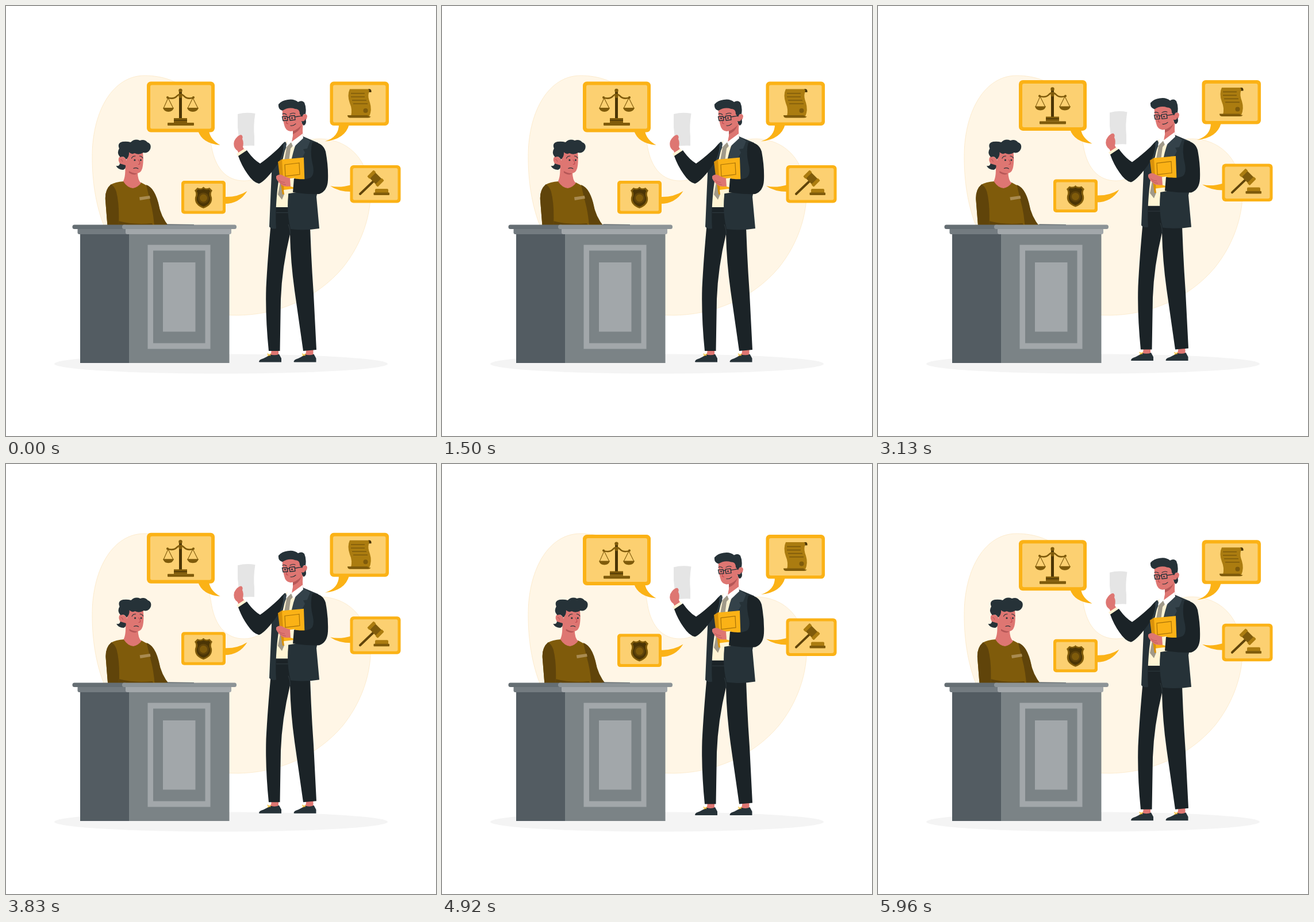
An HTML page for the animation above (6000 ms loop, 748x748 px).

```html
<!DOCTYPE html>
<html lang="en">
<head>
<meta charset="utf-8">
<title>Courtroom</title>
<style>
html, body { margin: 0; width: 100%; height: 100%; overflow: hidden; background: #fff; }
svg { display: block; width: 100vw; height: 100vh; }
.ink { fill: #263238; }
.coal { fill: #1b2327; }
.skin { fill: #de7672; }
.shade { fill: #b55757; }
.gold { fill: #fbb216; }
.pale { fill: #fcd071; }
.brown { fill: #7f5b0b; }
.dark { fill: #4b3505; }
.ochre { fill: #ab7c10; }
.cream { fill: #fff4d4; }
.line { fill: none; stroke: #263238; stroke-width: 1.1; stroke-linecap: round; }
.cut { fill: none; stroke: #7f5b0b; stroke-width: 1.6; }
</style>
</head>
<body>
<svg viewBox="0 0 748 748">
  <!-- backdrop -->
  <path fill="#fff6e6" stroke="#fbe6c0" stroke-width=".7" d="M241 121C186 121 151 182 150 258C149 350 176 430 250 492C300 532 352 538 405 538C470 537 540 510 586 455C614 420 631 378 634 335C635 275 602 233 548 231C505 230 481 259 459 281C446 296 432 304 414 304C383 304 366 282 359 252C353 224 351 185 327 157C305 131 272 121 241 121Z"/>
  <ellipse cx="374" cy="622.5" rx="290" ry="17" fill="#f4f4f4"/>

  <g id="accused">
    <path class="brown" d="M205 305Q190 306 182 311Q172 320 173 337L178 400H284Q270 372 267 352Q260 321 250 315L235 307Q220 312 205 305Z"/>
    <path fill="#60440a" d="M183 310Q172 319 173 337L178 400H195Q199 350 192 323Q189 314 183 310ZM244 311Q258 316 265 342Q269 366 284 384V400H259Q258 365 251 340Q247 324 244 311ZM196 374Q222 381 254 378L258 384H196Z"/>
    <path fill="#a98b51" d="M232 332.500L250 330L251 335L233 338Z"/>
    <path class="skin" d="M207 272Q209 295 204 305Q211 316 221 317Q230 315 235 308Q229 303 229 288Z"/>
    <path class="shade" d="M214 287Q220 291 228 291Q224 296 214 290Z"/>
    <path class="skin" d="M210 250Q229 241 238 253Q240 272 237 283Q234 292 226 291Q214 290 207 277Q198 278 196 269Q195 260 203 262Q208 264 210 269Z"/>
    <path class="ink" d="M199 263Q192 256 197 248Q193 238 203 236Q211 235 217 237Q224 230 233 234Q241 231 246 237Q254 240 251 249Q247 257 239 255Q231 260 224 256Q218 259 214 254Q215 262 209 267Q205 260 199 263ZM198 274Q198 279 191.500 278Q195 285 204 285Q209 283 208 277Z"/>
    <circle class="ink" cx="224" cy="268" r="1.6"/><circle class="ink" cx="234.500" cy="268" r="1.5"/>
    <path class="line" d="M218.500 265Q220 261 225 261M232.500 261Q236 261 238 264.500M222 282.500Q226 280.500 230 283"/>
    <path d="M230 267Q234 272 233 275L230 275.500" fill="none" stroke="#ba4149"/>
    <path d="M199 267Q202 266 203 271" fill="none" stroke="#b55757"/>
  </g>

  <!-- dock -->
  <path d="M278 381L281 379.500L327 380V382H278Z" fill="#39444a"/>
  <rect x="129" y="392" width="86" height="229" fill="#535c62"/>
  <rect x="214" y="392" width="174.500" height="229" fill="#7b8386"/>
  <rect x="124.500" y="386" width="90" height="11" rx="3" fill="#737b80"/>
  <rect x="208" y="386" width="184" height="11" rx="3" fill="#a2a7aa"/>
  <rect x="115.500" y="380.500" width="95" height="7.500" rx="3.500" fill="#656e73"/>
  <rect x="202" y="380.500" width="199" height="7.500" rx="3.500" fill="#8d9497"/>
  <g fill="#a2a7aa">
    <rect x="246.500" y="415.500" width="109" height="181"/>
    <rect x="256" y="425.500" width="90.500" height="161" fill="#7b8386"/>
    <rect x="273" y="446" width="56.500" height="120.500"/>
  </g>

  <g id="floating">
    <!-- speech bubbles -->
    <g class="gold">
      <path d="M334 217Q341 239 372.500 242Q355 232 353 217ZM579 206Q579 228 555 235.500Q590 232 597 206ZM380 332Q402 333 419.500 322Q406 344 380 344ZM601 311Q580 317 564 313Q578 323 601 323Z"/>
      <rect x="245" y="131.500" width="118" height="88" rx="7"/>
      <rect x="563.500" y="131.500" width="102.500" height="76.500" rx="6.500"/>
      <rect x="305" y="304" width="77" height="57.500" rx="5"/>
      <rect x="598.500" y="277" width="88" height="65.500" rx="6"/>
    </g>
    <g class="pale">
      <rect x="251" y="137.500" width="106" height="76" rx="3"/>
      <rect x="569" y="137.500" width="91.500" height="65" rx="3"/>
      <rect x="310" y="309" width="67" height="47.500" rx="2"/>
      <rect x="603.500" y="282" width="78" height="55.500" rx="3"/>
    </g>

    <!-- scales -->
    <path class="dark" d="M301 148H306V196H301Z"/>
    <path d="M280 159Q291 163 297 157Q303.500 150 310 157Q316 163 327 159" fill="none" stroke="#7f5b0b" stroke-width="2.600"/>
    <path class="line" style="stroke:#7f5b0b" d="M282 160L274 178M282 160L291 178M325 160L316 178M325 160L334 178"/>
    <path class="brown" d="M273 177H292Q290 184 282.500 184Q275 184 273 177ZM315 177H335Q333 184 325 184Q317 184 315 177ZM292 195H315V203H292Z"/>
    <path class="dark" d="M292 198H315V199.500H292Z"/>
    <rect class="brown" x="281" y="203" width="46" height="5" rx="1"/>
    <g class="brown"><circle cx="303.500" cy="147" r="3.200"/><circle cx="303.500" cy="157" r="3"/><circle cx="281" cy="159" r="2"/><circle cx="326" cy="159" r="2"/></g>

    <!-- scroll -->
    <path class="ochre" d="M598 144.500H633L631 151Q629 158 633 168Q637 181 632 192H600Q603 180 598 169Q593 155 598 144.500Z"/>
    <path class="dark" d="M630 144.500H633Q636 145 635.500 150H631Q633 147 630 144.500Z"/>
    <path class="brown" d="M594 190H629Q631 193 635 192Q633 194.500 630 194.500H598Q594 194 594 190Z"/>
    <path class="cut" d="M600 152H624M600 158H624M602 164H627M604 170H629"/>
    <circle class="brown" cx="625.500" cy="182" r="4"/>

    <!-- badge -->
    <path class="brown" d="M343.500 314.500Q347 319 354 316L359 321Q355 326 358 333Q360 346 343.500 352Q327 346 329 333Q332 326 328 321L333 316Q340 319 343.500 314.500Z"/>
    <path class="dark" d="M343.500 318Q348 321 353 319L355.500 322Q352 326 355 333Q357 344 343.500 349Q330 344 332 333Q335 326 331.500 322L334 319Q339 321 343.500 318Z"/>
    <circle cx="343.500" cy="334" r="9.500" fill="#60440a"/>
    <circle class="brown" cx="343.500" cy="334" r="6.500"/>

    <!-- gavel -->
    <path d="M616 327L639 305" stroke="#60440a" stroke-width="4" stroke-linecap="round"/>
    <g transform="translate(643 300) rotate(45)">
      <rect class="brown" x="-9" y="-7" width="18" height="14"/>
      <rect class="ochre" x="-13" y="-8" width="6" height="16" rx="1.500"/>
      <rect class="ochre" x="7" y="-8" width="6" height="16" rx="1.500"/>
    </g>
    <path class="ochre" d="M642 325V320Q642 318 644 318H663Q665 318 665 320V325Z"/>
    <rect class="brown" x="639.500" y="324.500" width="27.500" height="4.500" rx="1"/>

    <!-- legs and shoes -->
    <g id="shoe">
      <path class="skin" d="M462 597H474V608L459 609Q462 603 462 597Z"/>
      <path class="ink" d="M440 619Q440 615 448 613Q455 610 459 606Q468 609 475 605.500L479 613V619.500H441Z"/>
      <path d="M454.500 605L460 608M455 609L461 605" stroke="#fbc94c" stroke-width="1.500"/>
    </g>
    <use href="#shoe" x="60.500"/>
    <path class="coal" d="M468 350H528Q530 430 535 500L540 598L517 600L502 495Q495 445 494 397Q480 455 478 510L476.500 600H457Q451 540 452.500 490Q455 440 461 376Z"/>
    <path d="M494 397Q495 390 491 380M470 359.500H493" fill="none" stroke="#303b40"/>

    <!-- neck, shirt, tie and jacket -->
    <path class="skin" d="M499 208L517 202Q515 216 517 230L496 241L499 226Z"/>
    <path class="shade" d="M499 216.500Q508 215 514 207Q511 218 499 223Z"/>
    <path class="cream" d="M489 234L497 237L518 230L495 350H468L475 258Z"/>
    <path fill="#a19a89" d="M491 238L498 236L500 242L495 248L485 325L480 337L473 328L488 247Z"/>
    <path class="ink" d="M485 236Q472 247 463 268L458 384Q462 389 470 387Q468 360 472 320Q476 285 488 240Z"/>
    <path class="ink" d="M517 227L543 238Q553 275 540 332L545 387Q521 391 495 388Q488 360 491 330Q491 285 508 235Z"/>
    <path fill="#34424a" d="M517 227L529 235L524 248L517 249L520 255L491 310Q493 270 505 238ZM487 236L479 246L482 250L477 253L474 276L488 245Z"/>
    <path fill="#fff" d="M498 226L489 236L487 246L496 237L500 246L517 230L516 222L497 236Z"/>

    <!-- raised arm with sheet -->
    <path fill="#e5e5e5" d="M403 188Q418 184 433.500 187Q430 209 432 227L432 243Q419 242 405 245Q405 225 403 211Z"/>
    <path class="skin" d="M397 235Q402 225 409 224Q413 226 411 231Q414 237 412 245L415 251L405 258L403 252Q394 246 397 235Z"/>
    <path class="cream" d="M401 257L415 248L419 254L405 263Z"/>
    <path class="coal" d="M404 261L419 251Q430 267 442 274Q457 264 482 240Q485 260 466 284Q449 306 440 309Q430 307 420 292Q410 278 404 261Z"/>

    <!-- book and folded arm -->
    <path fill="#d9920b" d="M473 271L481 266L489 326L481 328Q476 300 473 271Z"/>
    <path class="gold" d="M480 267L518 263.500L520 320L484 326Z"/>
    <path d="M485 276L510 273L511 293L486 296Z" fill="none" stroke="#a87208" stroke-width="1.200"/>
    <path class="cream" d="M483 320L506 317V324L484 327.500Z"/>
    <path class="skin" d="M470 296Q474 292 480 294Q489 299 497 300L499 313Q489 315 482 313Q474 308 470 300Z"/>
    <path d="M474 303Q480 307 485 307M477 307Q482 311 487 311" fill="none" stroke="#b55757" stroke-width=".8"/>
    <path class="cream" d="M494 300L502 299V316L495 314Z"/>
    <path class="coal" d="M533 237Q551 237 556 253Q561 279 560 303Q559 322 545 327Q523 328 499 324L501 300Q519 303 529 299Q537 295 534 278Q528 254 533 237Z"/>

    <!-- head -->
    <path class="skin" d="M481 179Q494 169 512 178L515 190Q523 185 524 192Q523 201 514 202Q509 217 495 218Q486 217 484 207Q480 192 481 179Z"/>
    <path class="ink" d="M481 182Q473 180 474 171Q480 164 490 163Q501 161 508 167Q515 163 519 168Q523 177 521 188Q517 187 515 193L511 188Q511 179 503 179Q492 175 481 182ZM514 200Q519 202 521 196L522 201Q522 206 518 208Q515 206 514 200Z"/>
    <path class="line" d="M481 188Q484 186 488 189M494 188Q499 185 503 187M495 208Q500 209 504 205"/>
    <path d="M489 197L487.500 204L491 205" fill="none" stroke="#ba4149"/>
    <g class="line" stroke-linejoin="round" style="stroke-width:1.400">
      <path d="M480.500 192.500L489 192L490 199L482 199.500ZM493 191.500L502 190.500L503 198L494 199ZM489.500 194L493 193.500M502.500 193L515 191"/>
    </g>
    <circle class="ink" cx="485.500" cy="195.500" r="1.400"/><circle class="ink" cx="497.500" cy="195" r="1.400"/>
  </g>
</svg>
<script>
const LOOP = 6000, BOB = 1500, LIFT = 14.96, UNIT = 1.496;
const shake = [0, -1, 2, -4, 4, -4, 4, -4, 2, -1, 0];
const accused = document.getElementById('accused');
const floating = document.getElementById('floating');

function draw() {
  const t = (performance.now() + 40) % LOOP;
  const rise = 1 - Math.abs(1 - 2 * (t % BOB) / BOB);
  const p = t / LOOP * 10, i = Math.floor(p);
  const x = shake[i] + (shake[i + 1] - shake[i]) * (p - i);
  floating.setAttribute('transform', `translate(0 ${0.8 - LIFT * rise})`);
  accused.setAttribute('transform', `translate(${x * UNIT} 0)`);
  requestAnimationFrame(draw);
}
draw();
</script>
</body>
</html>
```
